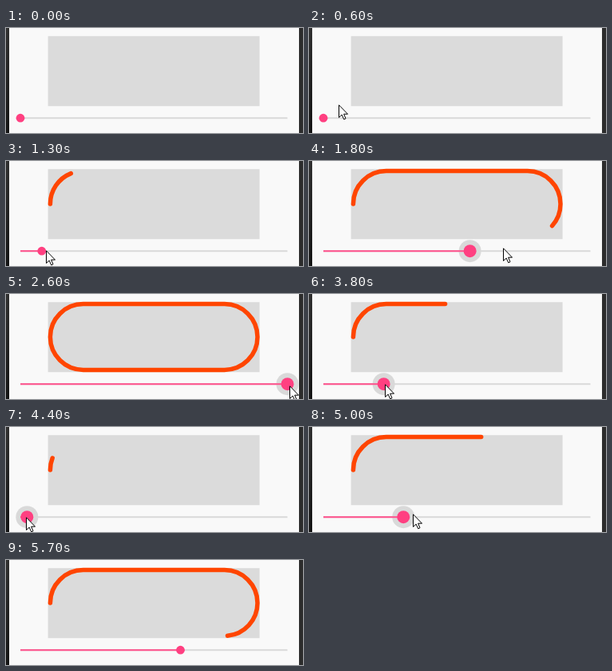
These frames come from a looping animation (372 by 132 pixels, 6 s). An HTML page:

```html
<!DOCTYPE html>
<html lang="en">
<head>
<meta charset="utf-8">
<title>Slider-driven outline</title>
<style>
  html, body { margin: 0; width: 100%; height: 100%; overflow: hidden; background: #f9f9f9; }
  svg { display: block; width: 372px; height: 132px; }
  .track { stroke: #d9d9d9; stroke-width: 2; }
  .fill { stroke: #ff4f8b; stroke-width: 2; }
  .outline { fill: none; stroke: #ff4500; stroke-width: 5.5; stroke-linecap: round; }
</style>
</head>
<body>
<svg viewBox="0 0 372 132">
  <defs>
    <linearGradient id="edge" x2="0" y2="1">
      <stop offset="0" stop-color="#303030"/>
      <stop offset="1" stop-color="#141414"/>
    </linearGradient>
  </defs>
  <rect width="372" height="132" fill="#f9f9f9"/>
  <rect width="4" height="132" fill="url(#edge)"/>
  <rect x="367" width="5" height="132" fill="#2c2c2c"/>
  <rect x="52.6" y="10.2" width="265" height="88" fill="#dbdbdb"/>
  <path id="outline" class="outline" pathLength="100"
    d="M55.4 54A41.4 41.4 0 0 1 96.8 12.6H273.6A41.4 41.4 0 0 1 273.6 95.4H96.8A41.4 41.4 0 0 1 55.4 54"/>
  <circle id="halo" cy="113.2" fill="#d9d9d9"/>
  <path class="track" d="M18 113.2H352.5"/>
  <path id="fill" class="fill"/>
  <circle id="thumb" cy="113.2" fill="#ff4081"/>
  <path id="cursor" fill="#fff" stroke="#000"
    d="M.5 .8V16.5L4.2 13.1 6.7 18.8 9 17.8 6.6 12.2H11.5Z"/>
</svg>
<script>
const LOOP = 6000, STEP = 100, LEFT = 18, RIGHT = 352.5, REST = 114.5;
const [outline, halo, fill, thumb, cursor] =
  ['outline', 'halo', 'fill', 'thumb', 'cursor'].map(id => document.getElementById(id));

const ramp = (t, a, b) => Math.min(1, Math.max(0, (t - a) / (b - a)));
const mix = (a, b, u) => a + (b - a) * u;
const smooth = u => u * u * (3 - 2 * u);
const power = k => u => u ** k;

// lead: how far the pointer runs ahead of the thumb; lift: how far it rises.
const drags = [
  { start: 1170, end: 2200, from: LEFT, to: RIGHT, ease: power(1.22), lead: 48, lift: 5.5 },
  { start: 2600, end: 3900, from: RIGHT, to: 68, ease: power(1.18), lead: -17, lift: 8 },
  { start: 3900, end: 4500, from: 68, to: LEFT, ease: power(1), lead: -30, lift: 4 },
  { start: 4600, end: 5400, from: LEFT, to: 218.5, ease: smooth, lead: 10, lift: 6 }
];

function dragAt(t) {
  const d = drags.filter(d => d.start <= t).pop() || drags[0];
  const u = ramp(t, d.start, d.end), arc = Math.sin(Math.PI * u);
  const x = mix(d.from, d.to, d.ease(u));
  return { x, px: x + 2 + d.lead * arc ** 3, py: REST - d.lift * arc };
}

// The pointer swoops in from the right and leaves up to the right.
function pointerAt(t, { px, py }) {
  const enter = ramp(t, 100, 700), leave = ramp(t, 5400, 5700);
  return [
    mix(mix(252, px, smooth(enter)), 385, leave),
    mix(py - 38 * Math.sin(Math.PI * enter), 25, leave)
  ];
}

function set(el, attrs) {
  for (const name in attrs) el.setAttribute(name, attrs[name]);
}

function draw(time) {
  const t = Math.floor(time % LOOP / STEP) * STEP;
  const drag = dragAt(t), [px, py] = pointerAt(t, drag);
  const held = ramp(t, 1300, 1500) - ramp(t, 5300, 5500);
  const progress = ramp(drag.x, LEFT, RIGHT);
  set(outline, {
    'stroke-dasharray': `${progress * 100} 200`,
    visibility: progress > 0 ? 'visible' : 'hidden'
  });
  set(fill, { d: `M${LEFT} 113.2H${drag.x}` });
  set(thumb, { cx: drag.x, r: 5.4 + 2.6 * held });
  set(halo, { cx: drag.x, r: 14 * held });
  set(cursor, {
    transform: `translate(${Math.round(px)} ${Math.round(py)})`,
    visibility: t >= 100 && t < 5700 ? 'visible' : 'hidden'
  });
}

const start = performance.now();
function tick() {
  draw(performance.now() - start);
  requestAnimationFrame(tick);
}
tick();
</script>
</body>
</html>
```
